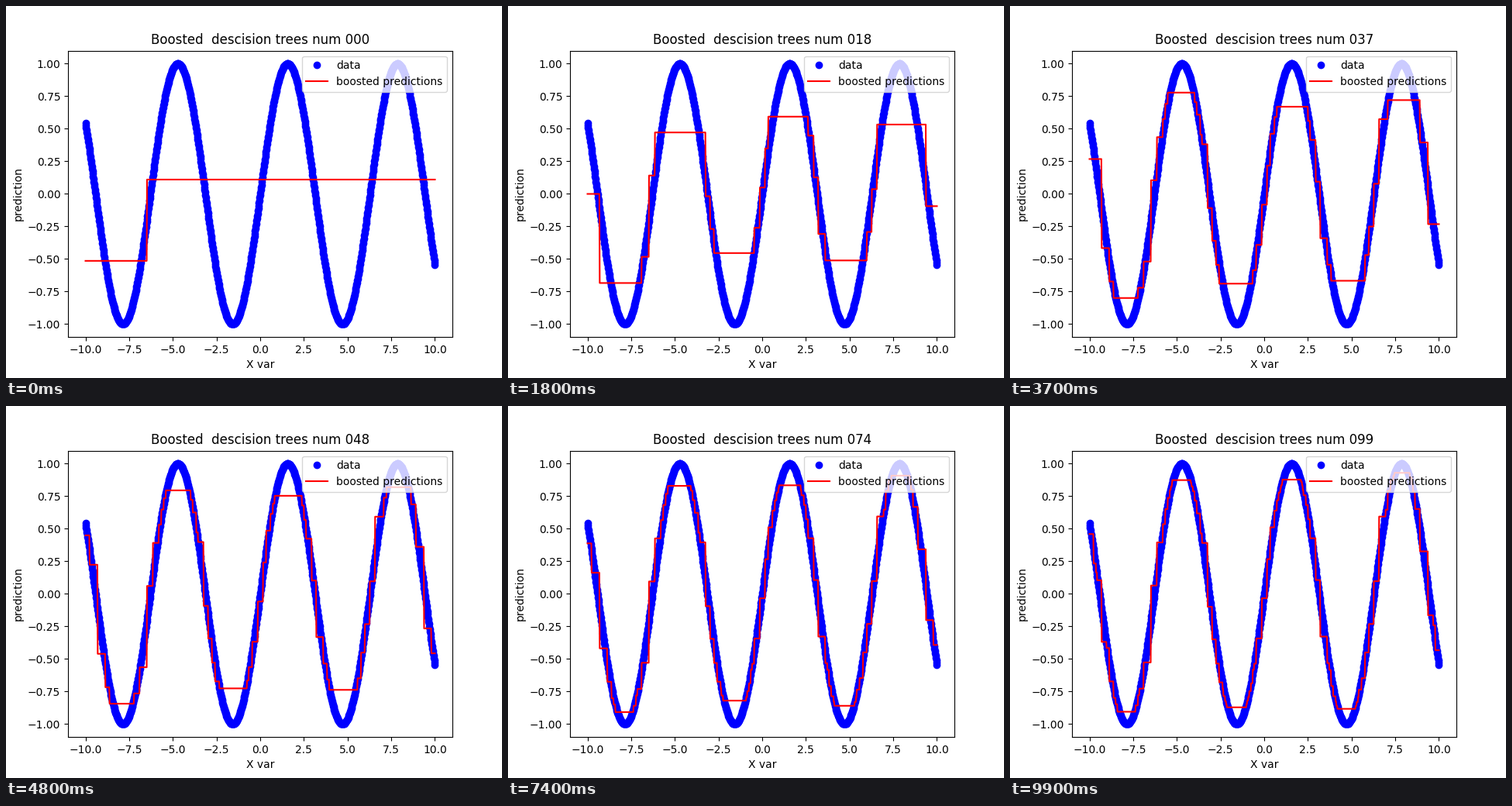
A matplotlib script that plays this animation: 640 px wide and 480 px high, repeating every 10 s.

```python
import numpy as np
import matplotlib.pyplot as plt
from matplotlib.animation import FuncAnimation

TREES = 100
POINTS = 1000


def fit_stump(residual):
    """Return the best single-split fit to values ordered along x."""
    n = len(residual)
    left = np.arange(1, n)
    total = residual.sum()
    left_sum = np.cumsum(residual)[:-1]
    score = left_sum**2 / left + (total - left_sum) ** 2 / (n - left)
    # Rounding makes mirrored splits tie, so the leftmost one wins.
    cut = left[np.argmax(np.round(score, 8))]
    fit = np.empty(n)
    fit[:cut] = residual[:cut].mean()
    fit[cut:] = residual[cut:].mean()
    return fit


def boost(y, trees):
    """Return the ensemble prediction after each added stump."""
    stages = []
    pred = np.zeros_like(y)
    for _ in range(trees):
        pred = pred + fit_stump(y - pred)
        stages.append(pred)
    return stages


x = np.linspace(-10, 10, POINTS)
y = np.sin(x)
stages = boost(y, TREES)

fig, ax = plt.subplots(figsize=(6.4, 4.8), dpi=100)
ax.plot(x, y, "o", color="blue", label="data")
line, = ax.plot(x, stages[0], color="red", label="boosted predictions")
ax.set_xlabel("X var")
ax.set_ylabel("prediction")
title = ax.set_title("")
ax.legend(loc="upper right")


def update(i):
    line.set_ydata(stages[i])
    title.set_text(f"Boosted  descision trees num {i:03d}")
    return line, title


anim = FuncAnimation(fig, update, frames=TREES, interval=100,
                     repeat=True, repeat_delay=0)
plt.show()
```
